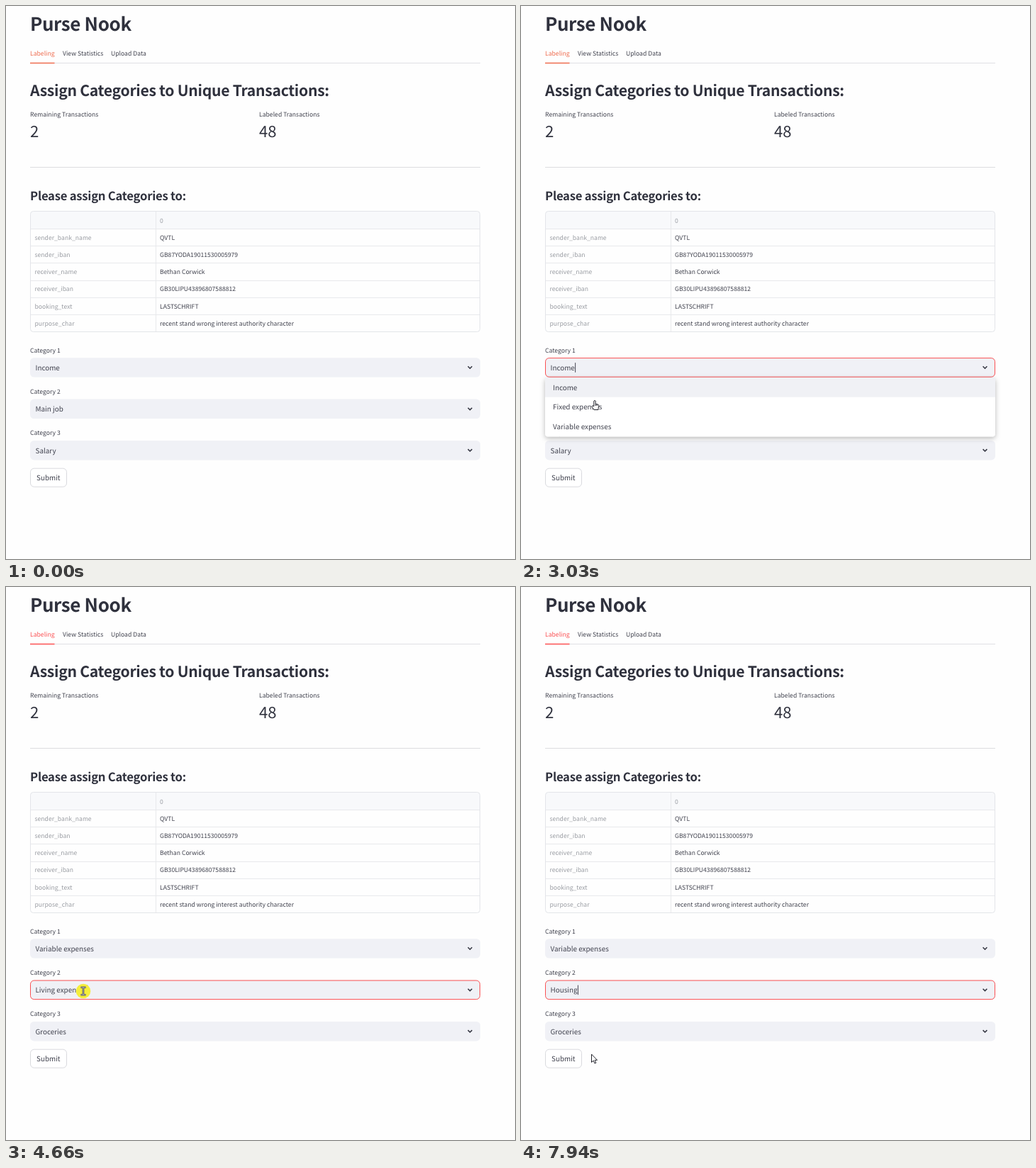
Write an HTML page that moves like this. It is 718 px wide and 780 px high and loops after 8 s.

```html
<!DOCTYPE html>
<html lang="en">
<head>
<meta charset="utf-8">
<title>Purse Nook</title>
<style>
html, body { margin: 0; width: 100%; height: 100%; overflow: hidden; background: #fefefe; }
svg { display: block; width: 718px; height: 780px; }
text {
  font-family: "Noto Sans CJK JP", "Noto Sans CJK SC", "Noto Sans CJK KR", "Noto Sans CJK", "Open Sans", sans-serif;
  font-size: 9.88px; fill: #40424e; text-rendering: geometricPrecision;
}
.h1, .h2, .h3 { font-weight: 600; letter-spacing: -.015em; fill: #2f313d; }
.h1 { font-size: 26px; }
.h2 { font-size: 21.2px; }
.h3 { font-size: 16.7px; }
.num { font-size: 22.2px; fill: #31333f; }
.small { font-size: 8.65px; }
.key { font-size: 8.65px; fill: #9a9da3; }
</style>
</head>
<body>
<script>
const NS = "http://www.w3.org/2000/svg";
const LOOP = 8000, STEP = 70;
const LEFT = 34, WIDTH = 635, BOX_H = 27.4, ITEM_H = 27.65;
const BOX_Y = [496.2, 554.6, 613];
const RED = "#fb5052";

function add(parent, tag, attrs = {}, content) {
  const el = document.createElementNS(NS, tag);
  for (const k in attrs) el.setAttribute(k, attrs[k]);
  if (content !== undefined) el.textContent = content;
  parent.appendChild(el);
  return el;
}
const label = (parent, x, y, str, cls = "") => add(parent, "text", { x, y, class: cls }, str);
const rect = (parent, x, y, width, height, attrs) => add(parent, "rect", { x, y, width, height, ...attrs });
const line = (parent, d, stroke, w = 1) => add(parent, "path", { d, stroke, "stroke-width": w, fill: "none" });
const show = (el, on) => el.setAttribute("visibility", on ? "visible" : "hidden");
const within = (t, [a, b]) => t >= a && t < b;

const svg = add(document.body, "svg", { viewBox: "0 0 718 780" });
const shadow = add(add(svg, "defs"), "filter", { id: "shadow", x: "-5%", y: "-15%", width: "110%", height: "140%" });
add(shadow, "feDropShadow", { dx: 0, dy: 2.5, stdDeviation: 3.6, "flood-color": "#000", "flood-opacity": .28 });

// Page header
label(svg, 34, 35, "Purse Nook", "h1");
const tab = label(svg, 34, 70, "Labeling", "small");
label(svg, 80, 70, "View Statistics", "small");
label(svg, 148, 70, "Upload Data", "small");
line(svg, "M34 80.5H669", "#dfe0e4");
const underline = line(svg, "M34 80.5H68.5", RED, 1.5);
label(svg, 34, 126.5, "Assign Categories to Unique Transactions:", "h2");
label(svg, 34, 155.6, "Remaining Transactions", "small");
label(svg, 357, 155.6, "Labeled Transactions", "small");
label(svg, 34, 185, "2", "num");
label(svg, 357, 185, "48", "num");
line(svg, "M34 227.5H669", "#dcdde0");
label(svg, 34, 273.6, "Please assign Categories to:", "h3");

// Table
const rows = [
  ["", "0"],
  ["sender_bank_name", "QVTL"],
  ["sender_iban", "GB87YODA19011530005979"],
  ["receiver_name", "Bethan Corwick"],
  ["receiver_iban", "GB30LIPU43896807588812"],
  ["booking_text", "LASTSCHRIFT"],
  ["purpose_char", "recent stand wrong interest authority character"]
];
const GRID = "#e8e9ec";
add(svg, "path", { d: "M34.5 314.5V293.5Q34.5 289.5 38.5 289.5H664.5Q668.5 289.5 668.5 293.5V314.5Z", fill: "#f8f9fb" });
rows.forEach(([key, value], i) => {
  const base = 305.6 + i * 24.2;
  if (i) line(svg, `M34.5 ${Math.floor(290.2 + i * 24.2) + .5}H668.5`, GRID);
  label(svg, 40.5, base, key, "key");
  label(svg, 217, base, value, i ? "small" : "key");
});
line(svg, "M211.5 289.5V459.5", GRID);
rect(svg, 34.5, 289.5, 634, 170, { rx: 4, fill: "none", stroke: "#e3e5e9" });

// Select boxes
const selects = BOX_Y.map((y, i) => {
  label(svg, 34, y - 7.7, "Category " + (i + 1), "small");
  rect(svg, LEFT, y, WIDTH, BOX_H, { rx: 5.5, fill: "#f0f1f6" });
  const ring = rect(svg, LEFT + .5, y + .4, WIDTH - 1, BOX_H - .8, { rx: 5.2, fill: "none", stroke: RED });
  const mid = y + 13.6;
  line(svg, `M651.6 ${mid - 1.5}l2.9 2.9 2.9 -2.9`, "#31333f", 1.5);
  return { ring, value: label(svg, 41.5, mid + 3.9, "") };
});
rect(svg, 34.5, 652.2, 51, 26, { rx: 5.2, fill: "#fff", stroke: "#d9dade" });
label(svg, 43, 668.9, "Submit");
const caret = line(svg, "", "#31333f", .9);

// Dropdown menus
function makeMenu(top, items, open) {
  const group = add(svg, "g");
  const height = items.length * ITEM_H + .4;
  rect(group, LEFT, top, WIDTH, height, { rx: 4, fill: "#fff", filter: "url(#shadow)" });
  const bar = rect(group, LEFT, top, WIDTH, ITEM_H, { fill: "#f0f1f5" });
  items.forEach((s, i) => label(group, 45, top + 17.6 + i * ITEM_H, s));
  return { group, bar, top, count: items.length, height, open };
}
const menus = [
  makeMenu(524, ["Income", "Fixed expenses", "Variable expenses"], [2560, 3860]),
  makeMenu(582.4, ["Living expenses", "Health", "Housing", "Mobility", "Entertainment", "Education", "Miscellaneous"], [4730, 7870])
];

// Pointer
const pointer = add(svg, "g");
const glow = add(pointer, "circle", { r: 10.3, fill: "#f5ee3c" });
const outline = { fill: "#fff", stroke: "#22232b", "stroke-width": 1, "stroke-linejoin": "round" };
const beam = add(pointer, "g");
const BEAM = "M-3.6 -5.2H3.6M-3.6 5.2H3.6M0 -5.2V5.2";
line(beam, BEAM, "#44454c", 2.6);
line(beam, BEAM, "#d8d9dc", .8);
const shapes = {
  beam,
  arrow: add(pointer, "path", { d: "M0 0V11.4L2.7 9 4.5 13 6.3 12.2 4.6 8.3H8Z", ...outline }),
  hand: add(pointer, "path", {
    d: "M-1.2 1.2Q0 -.4 1.2 1.2V5.2L5 6.2Q6 6.6 5.9 8L5 11.4V13.5H-1.2L-4.3 8.8Q-3.6 7-1.2 8.6ZM3.2 6V8M1.2 5.2V8",
    ...outline
  })
};

const path = [
  [720, 195, 711], [1280, 100, 509.5], [2750, 100, 509.5], [3030, 104, 556], [3170, 105, 586],
  [3240, 105, 587], [3590, 104.5, 596], [4060, 104.5, 596], [4330, 109, 570], [5200, 109, 570],
  [5970, 102, 639], [6040, 101.5, 641], [6460, 99, 654], [6880, 99, 654], [6920, 99.5, 659]
];
const clicks = [[2410, 2560], [3790, 3860], [4590, 4730], [7800, 7870]];
const carets = [[2490, 3240], [4660, 5200], [5750, 6300], [6850, 7400], [7870, LOOP]];

function pointerAt(t) {
  const i = path.findIndex(p => p[0] > t);
  if (i < 0) return path[path.length - 1].slice(1);
  if (i === 0) return path[0].slice(1);
  const [a, ax, ay] = path[i - 1], [b, bx, by] = path[i];
  const u = Math.floor((t - a) / STEP) * STEP / (b - a);
  const e = u * u * (3 - 2 * u);
  return [ax + (bx - ax) * e, ay + (by - ay) * e];
}

function pointerKind(y, menu) {
  if (menu && y > menu.top && y < menu.top + menu.height) return "hand";
  return BOX_Y.some(top => y >= top && y <= top + BOX_H) ? "beam" : "arrow";
}

function draw(t) {
  const accent = t < 3790 ? "#ee6b4e" : RED;
  tab.style.fill = accent;
  underline.setAttribute("stroke", accent);

  const values = [
    t < 3860 ? "Income" : "Variable expenses",
    t < 3930 ? "Main job" : t < 7870 ? "Living expenses" : "Housing",
    t < 3930 ? "Salary" : "Groceries"
  ];
  const focus = t < 2490 ? -1 : t < 4660 ? 0 : 1;
  selects.forEach((s, i) => {
    if (s.value.textContent !== values[i]) s.value.textContent = values[i];
    show(s.ring, i === focus);
  });

  const blink = focus >= 0 && carets.some(c => within(t, c));
  show(caret, blink);
  if (blink) {
    const x = 42.3 + selects[focus].value.getComputedTextLength();
    caret.setAttribute("d", `M${x} ${BOX_Y[focus] + 7}v13.6`);
  }

  const lagY = pointerAt(t - 75)[1];
  let current = null;
  for (const m of menus) {
    const on = within(t, m.open);
    show(m.group, on);
    if (!on) continue;
    current = m;
    const row = Math.max(0, Math.min(m.count - 1, Math.floor((lagY - m.top) / ITEM_H)));
    m.bar.setAttribute("y", m.top + row * ITEM_H);
  }

  const [x, y] = pointerAt(t);
  const kind = pointerKind(y, current);
  const seen = t >= path[0][0];
  pointer.setAttribute("transform", `translate(${x} ${y})`);
  show(glow, clicks.some(c => within(t, c)));
  for (const k in shapes) show(shapes[k], seen && k === kind);
}

const start = performance.now();
function frame() {
  draw((performance.now() - start) % LOOP);
  requestAnimationFrame(frame);
}
frame();
</script>
</body>
</html>
```
